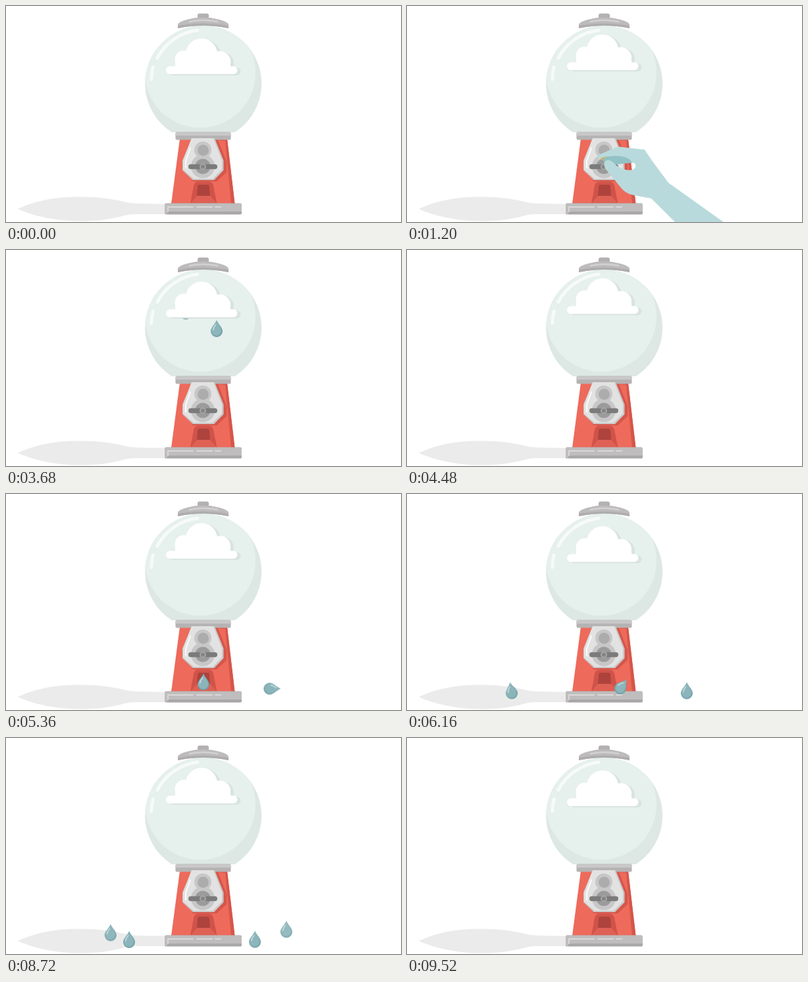
Animation of 600x330 px, one loop 9.6 s. Source, as an HTML page:

```html
<!DOCTYPE html>
<html lang="en">
<head>
<meta charset="utf-8">
<title>Rain machine</title>
<style>
  html, body { margin: 0; width: 100%; height: 100%; overflow: hidden; background: #fff; }
  svg { display: block; width: 600px; height: 330px; }

  .cloud { fill: #fff; animation: bob 1.6s ease-in-out infinite alternate; }
  .puffs { animation: grey 9.6s linear infinite; }
  .dim { opacity: 0; animation: dim 9.6s linear infinite; }
  .hand { animation: reach 9.6s ease-in-out infinite; }
  .coin { transform-origin: 300px 231px; animation: insert 9.6s linear infinite; }
  .knob { transform-origin: 299px 245.5px; animation: spin 9.6s linear infinite; }
  .rain { opacity: 0; animation: fall 9.6s linear var(--at) infinite; }
  .roll { opacity: 0; animation: roll 9.6s linear var(--out) infinite; }
  .rise { animation: rise 9.6s linear var(--up) infinite; }

  @keyframes bob { to { transform: translateY(-7px); } }

  @keyframes grey {
    0%, 25.8% { fill: #fff; }
    33.3%, 36.65% { fill: #dfe6e7; }
    36.66%, 100% { fill: #fff; }
  }

  @keyframes dim {
    0%, 25.8% { opacity: 0; }
    33.3%, 34.99% { opacity: .55; }
    35%, 100% { opacity: 0; }
  }

  @keyframes reach {
    0%, 3.8% { transform: translate(200px, 128px); }
    11.2%, 15% { transform: none; }
    21.5%, 100% { transform: translate(200px, 128px); }
  }

  @keyframes insert {
    0%, 11.6% { transform: none; }
    14.4%, 100% { transform: scaleY(0); }
  }

  @keyframes spin {
    0%, 21.46% { transform: none; animation-timing-function: ease-in-out; }
    33.33%, 100% { transform: rotate(-360deg); }
  }

  @keyframes fall {
    0% { opacity: 1; transform: none; animation-timing-function: cubic-bezier(.33, 0, .67, .33); }
    4.8% { opacity: 1; transform: translateY(118px); }
    4.81%, 100% { opacity: 0; transform: translateY(118px); }
  }

  /* --x, --y: travel from the chute; --d: direction of the roll */
  @keyframes roll {
    0% { opacity: 1; transform: translate(0, -12px) scale(.2); }
    1.9%, 3.1% { opacity: 1; transform: translate(0, 0) rotate(0deg); }
    8.33% {
      transform: translate(calc(var(--x) * .83), calc(var(--y) * .77)) rotate(calc(var(--d) * 90deg));
      animation-timing-function: ease-out;
    }
    9.3% {
      transform: translate(calc(var(--x) + var(--d) * 4px), var(--y)) rotate(calc(var(--d) * 80deg));
      animation-timing-function: ease-in;
    }
    10.4% { transform: translate(var(--x), var(--y)) rotate(calc(var(--d) * 10deg)); }
    11.2% { transform: translate(var(--x), var(--y)) rotate(calc(var(--d) * -9deg)); }
    12.1% { transform: translate(var(--x), var(--y)) rotate(calc(var(--d) * 4deg)); }
    13%, 50% { opacity: 1; transform: translate(var(--x), var(--y)) rotate(0deg); }
    50.01%, 100% { opacity: 0; transform: translate(var(--x), var(--y)) rotate(0deg); }
  }

  @keyframes rise {
    0% { opacity: 1; transform: none; animation-timing-function: ease-in; }
    5% { opacity: .8; transform: translate(2px, -20px); }
    8.2% { opacity: .25; transform: translate(0, -41px); }
    8.34%, 50% { opacity: 0; transform: translate(0, -42px); }
    50.01%, 100% { opacity: 1; transform: none; }
  }
</style>
</head>
<body>
<svg viewBox="0 0 600 330">
  <defs>
    <clipPath id="bowl"><path d="M211 30H389V193H211Z"/></clipPath>
    <clipPath id="ball"><circle cx="299.7" cy="118.5" r="88.5"/></clipPath>
    <g id="puff">
      <rect x="243" y="92" width="108.5" height="12" rx="6"/>
      <circle cx="297" cy="73.5" r="24"/>
      <circle cx="270" cy="81.5" r="13.5"/>
      <circle cx="325" cy="85" r="16"/>
      <path d="M257 82H341V97H257Z"/>
    </g>
    <g id="drop">
      <path fill="#719fa7" d="M0-13C2-7 9-2 9 4A9 9 0 0 1-9 4C-9-2-2-7 0-13Z"/>
      <path fill="#8bb5ba" d="M0-12C2-6 7.2-2 7.2 3.5A7.6 7.6 0 0 1-8 3.5C-8-2-2-7 0-12Z"/>
      <path fill="none" stroke="#c3dcde" stroke-width="1.7" stroke-linecap="round" d="M-1.5-6Q-5-2-5.3 2"/>
    </g>
  </defs>

  <!-- ground shadow -->
  <path fill="#ebebeb" d="M18 310C45 297 75 291.500 112 291.500C145 291.500 168 296 185 300.500Q192 302 242 302.500V318H197Q187 318 180 320C160 326 140 328.500 112 328.500C75 328.500 42 321 18 310Z"/>

  <!-- globe -->
  <g clip-path="url(#bowl)">
    <circle cx="299.700" cy="118.500" r="88.500" fill="#dde8e4"/>
    <g clip-path="url(#ball)"><circle cx="295" cy="102" r="84" fill="#e6f0ed"/></g>
    <circle class="dim" cx="299.700" cy="118.500" r="88.500" fill="#93a9ae"/>
    <g fill="none" stroke="#f6faf9" stroke-width="5" stroke-linecap="round">
      <path d="M229.800 79.600A80 80 0 0 1 291 37"/>
      <path d="M223.200 93.500A80 80 0 0 0 220.800 112"/>
    </g>
    <g id="rain"></g>
    <g class="cloud">
      <use href="#puff" x="5" y="2" fill="#d9e4e0"/>
      <g class="puffs"><use href="#puff"/></g>
    </g>
  </g>

  <!-- lid -->
  <rect x="291" y="11.500" width="17" height="8" rx="3" fill="#b2b0b0"/>
  <path fill="#bdbbbb" d="M261 34V28Q264 23 276 20.500Q299 14 323 20.500Q335 23 338 28V34Q300 26 261 34Z"/>
  <path fill="#aeacac" d="M261 34V30Q300 23 338 30V34Q300 26 261 34Z"/>
  <path fill="none" stroke="#d3d1d1" stroke-width="2.500" stroke-linecap="round" d="M279 24Q299 19.500 321 24"/>

  <!-- body -->
  <path fill="#ee6a5b" d="M264 203H336L347.500 302H251Z"/>
  <path fill="#d5564b" d="M317 204H336L347.500 302H342L333 206L322 205L335 238V254L320 268H284L282 266H316L330 251V236Z"/>
  <rect x="257.500" y="192.500" width="84" height="12" rx="2" fill="#b5b3b3"/>
  <path fill="#c9c7c7" d="M259 192.500H340Q341.500 193 341.500 195V198H257.500V195Q257.500 193 259 192.500Z"/>

  <path fill="#c9c8c8" d="M282 202H317L330.500 236V251L316 266H284L268 251V236Z"/>
  <path fill="#e3e2e2" d="M282 202H315L328 236V250L314 264H285L269 250V236Z"/>
  <path fill="none" stroke="#fafafa" stroke-width="2" stroke-linecap="round" d="M273 247V237L280 217"/>
  <circle cx="299" cy="245" r="18" fill="#c8c7c7"/>
  <circle cx="299" cy="220" r="13" fill="#c8c7c7"/>
  <circle cx="299.500" cy="220.500" r="8.500" fill="#adacac"/>
  <circle cx="299" cy="245" r="11.500" fill="#9c9b9b"/>
  <g class="knob">
    <rect x="277" y="241.800" width="44" height="7.500" rx="3.700" fill="#7b7b7b"/>
    <circle cx="299" cy="245.500" r="5" fill="#a6a6a6"/>
    <circle cx="299" cy="245.500" r="3" fill="#858585"/>
  </g>

  <path fill="#d0534a" d="M280 302L285 275Q286 268.500 292 268.500H308Q314 268.500 315 275L320.500 302Z"/>
  <path fill="#ad433d" d="M290 290L291 276Q291.500 273 294 273H306Q308.500 273 309 276L310 290Z"/>
  <path fill="#df6054" d="M280 302L290 290H310L320.500 302Z"/>

  <!-- foot -->
  <rect x="241" y="301.500" width="117" height="17" rx="2" fill="#a9a7a7"/>
  <path fill="#bfbdbd" d="M243 301.500H356Q358 302 358 304V314H245V318H243Q241 318 241 316V304Q241 302 243 301.500Z"/>
  <g fill="none" stroke="#dad8d8" stroke-width="2" stroke-linecap="round">
    <path d="M246 314V307H284"/><path d="M290 307H313"/><path d="M318 307H326"/>
  </g>

  <g id="ground"></g>

  <!-- hand with coin -->
  <g class="hand">
    <g class="coin">
      <circle cx="300" cy="231" r="7" fill="#f2b544"/>
      <circle cx="300" cy="231" r="4" fill="#e09a2e"/>
    </g>
    <path fill="#91c2c5" d="M297 233Q318 224 344 231L346 239L318 242Q306 236 299 238Z"/>
    <path fill="#b9dadc" d="M291 234Q288 230 292 227L318 216Q322 214.500 326 215.500L361 219.500L372 236L397 270L503 346H423L371 294L344 289Q331 287 322 274L301 248Q297 239 303 236Q309 234 314 240Q323 249 334 250.500Q345 252 347 246Q348 240 341 238Q338 232 327 230Q308 227 291 234Z"/>
  </g>
</svg>
<script>
  // x, start (ms)
  const rain = [[320, 3440], [273, 3585], [305, 3750], [286, 3930]];
  // resting x and y, leaves chute, rises (ms)
  const drops = [
    [425, 300.5, 4560, 8440],
    [158.5, 300.5, 5160, 8560],
    [378, 309, 5660, 8620],
    [187, 308, 6200, 8700]
  ];
  const use = '<use href="#drop"/>';

  document.getElementById('rain').innerHTML = rain.map(([x, at]) =>
    `<g transform="translate(${x} 88)"><g class="rain" style="--at:${at}ms">${use}</g></g>`).join('');

  document.getElementById('ground').innerHTML = drops.map(([x, y, out, up]) =>
    `<g transform="translate(300 287)"><g class="rise" style="--up:${up}ms">
      <g class="roll" style="--out:${out}ms;--x:${x - 300}px;--y:${y - 287}px;--d:${Math.sign(x - 300)}">${use}</g>
    </g></g>`).join('');
</script>
</body>
</html>
```
